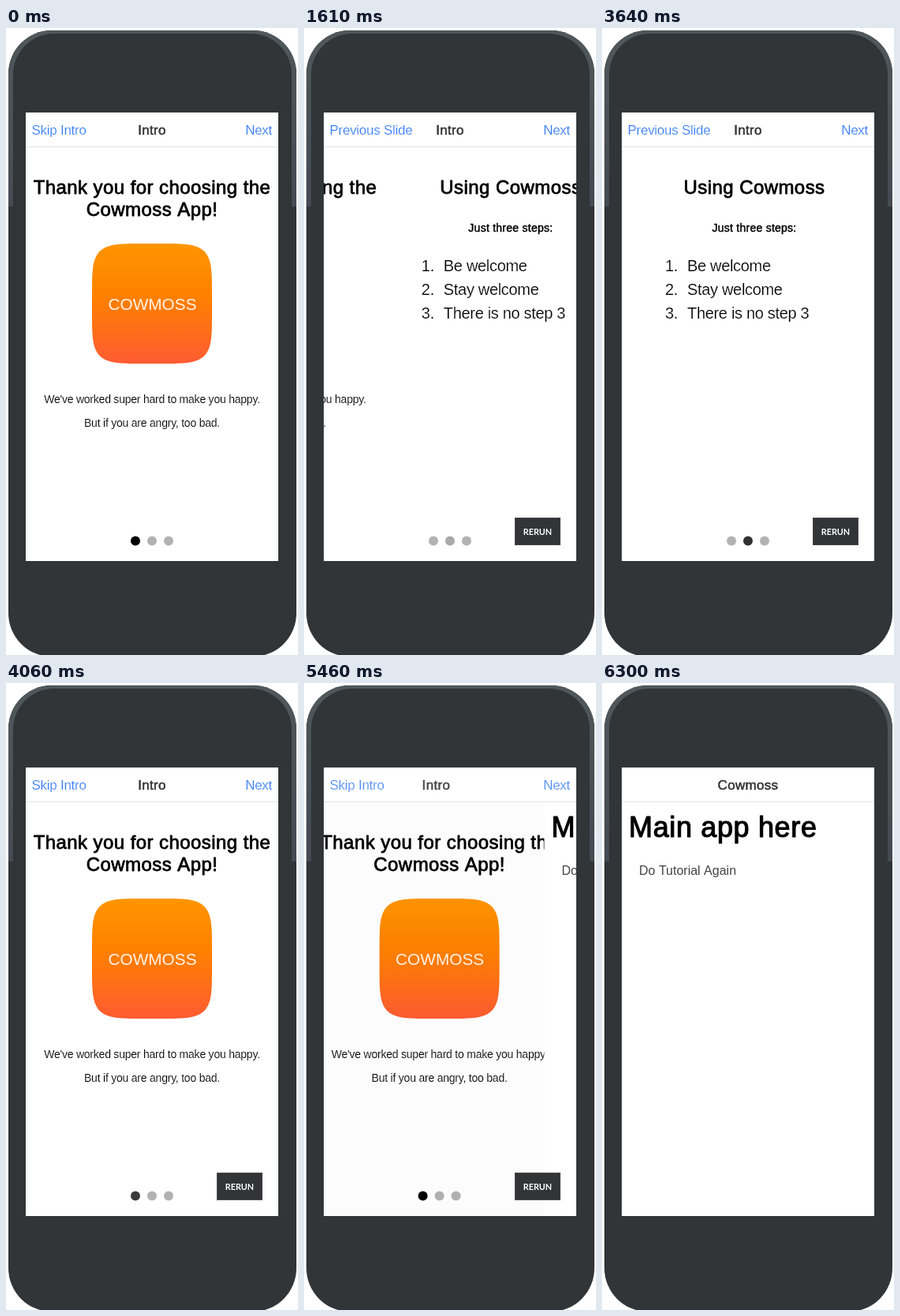
Recreate the animation shown at these times as an HTML page with a canvas. Size 370x794 px, loop 6.79 s.

```html
<!DOCTYPE html>
<html lang="en">
<head>
<meta charset="utf-8">
<title>App intro</title>
<style>
html, body { margin: 0; width: 100%; height: 100%; overflow: hidden; background: #fff; }
canvas { display: block; width: 370px; height: 794px; }
</style>
</head>
<body>
<canvas id="stage"></canvas>
<script>
const W = 370, H = 794, LOOP = 6790, TICK = 70;
const SCREEN = { x: 25, y: 107, w: 320, h: 568 };
const MID = 185, BLUE = '#387ef5';

const canvas = document.getElementById('stage');
const ctx = canvas.getContext('2d');
const dpr = window.devicePixelRatio || 1;
canvas.width = W * dpr;
canvas.height = H * dpr;

const clamp = v => Math.min(1, Math.max(0, v));
const ramp = (t, a, b) => clamp((t - a) / (b - a));

// CSS-style cubic-bezier easing, solved by bisection
function bezier(x1, y1, x2, y2) {
  const at = (a, b, u) => 3 * a * u * (1 - u) ** 2 + 3 * b * u * u * (1 - u) + u ** 3;
  return x => {
    if (x <= 0 || x >= 1) return clamp(x);
    let lo = 0, hi = 1;
    for (let i = 0; i < 24; i++) {
      const mid = (lo + hi) / 2;
      if (at(x1, x2, mid) < x) lo = mid; else hi = mid;
    }
    return at(y1, y2, lo);
  };
}
const ease = bezier(0.25, 0.1, 0.25, 1);
const easeIn = bezier(0.42, 0, 1, 1);
const easeView = bezier(0.36, 0.66, 0.04, 1);

// Each swipe is dragged from one page to `drag`, then settles after release
const SWIPES = [
  { start: 1300, release: 1535, from: 0, drag: 0.594, to: 1 },
  { start: 2345, release: 2545, from: 1, drag: 1.456, to: 2 },
  { start: 3120, release: 3310, from: 2, drag: 1.5, to: 1 },
  { start: 3620, release: 3745, from: 1, drag: 0.53, to: 0 }
];

function slider(t) {
  const state = { pos: 0, page: 0, dot: 1 };
  for (const s of SWIPES) {
    if (t < s.start) break;
    if (t < s.release) {
      state.pos = s.from + (s.drag - s.from) * ramp(t, s.start, s.release) ** 1.6;
    } else {
      state.pos = s.drag + (s.to - s.drag) * ease(ramp(t, s.release, s.release + 300));
      state.page = s.to;
      state.dot = 0.3 + 0.7 * easeIn(ramp(t, s.release, s.release + 400));
    }
  }
  return state;
}

// weight: 'light' trims the outline with the backdrop, 'medium' thickens it
function text(str, x, y, size, { weight = 'regular', align = 'left', color = '#000' } = {}) {
  const spacing = { light: -0.016, regular: 0, medium: 0.018 }[weight];
  ctx.font = `${size}px "Liberation Sans", Arial, sans-serif`;
  ctx.letterSpacing = `${spacing * size}px`;
  ctx.textAlign = align;
  ctx.fillStyle = color;
  ctx.fillText(str, x, y);
  if (weight !== 'regular') {
    ctx.strokeStyle = weight === 'light' ? '#fff' : color;
    ctx.lineWidth = size * (weight === 'light' ? 0.012 : 0.032);
    ctx.lineJoin = 'round';
    ctx.strokeText(str, x, y);
  }
  ctx.letterSpacing = '0px';
}

function rounded(x, y, w, h, r, fill) {
  ctx.beginPath();
  ctx.roundRect(x, y, w, h, r);
  ctx.fillStyle = fill;
  ctx.fill();
}

// Superellipse tile with half-width r
function squircle(cx, cy, r, fill) {
  const curve = v => Math.sign(v) * Math.abs(v) ** 0.4 * r;
  ctx.beginPath();
  for (let i = 0; i < 360; i++) {
    const a = i * Math.PI / 180;
    ctx.lineTo(cx + curve(Math.cos(a)), cy + curve(Math.sin(a)));
  }
  ctx.fillStyle = fill;
  ctx.fill();
}

function clipped(x, y, w, h, draw) {
  ctx.save();
  ctx.beginPath();
  ctx.rect(x, y, w, h);
  ctx.clip();
  draw();
  ctx.restore();
}

function faded(alpha, draw) {
  if (alpha <= 0) return;
  ctx.save();
  ctx.globalAlpha = alpha;
  draw();
  ctx.restore();
}

function shifted(dx, draw) {
  ctx.save();
  ctx.translate(dx, 0);
  draw();
  ctx.restore();
}

function drawPhone() {
  const body = '#313538';
  rounded(3, 3, 365, 793, 55, body);
  clipped(0, 0, W, 226, () => {
    const rim = ctx.createLinearGradient(0, 3, 0, 226);
    rim.addColorStop(0, '#51585b');
    rim.addColorStop(0.47, '#4b5256');
    rim.addColorStop(1, '#454a54');
    rounded(3, 3, 365, 793, 55, rim);
    rounded(9, 7, 353, 785, 52, body);
  });
}

const heading = (str, y) => text(str, MID, y, 24, { weight: 'medium', align: 'center' });
const para = (str, y) => text(str, MID, y, 14, { weight: 'light', align: 'center' });

const PAGES = [
  () => {
    heading('Thank you for choosing the', 210);
    heading('Cowmoss App!', 238);
    const fill = ctx.createLinearGradient(0, 273, 0, 425);
    fill.addColorStop(0, '#ff9500');
    fill.addColorStop(0.45, '#ff8000');
    fill.addColorStop(1, '#ff5b32');
    squircle(MID, 349, 76, fill);
    text('COWMOSS', 185.5, 357, 20.8, { align: 'center', color: '#fff4e8' });
    para("We've worked super hard to make you happy.", 475);
    para('But if you are angry, too bad.', 505);
  },
  () => {
    heading('Using Cowmoss', 210);
    text('Just three steps:', MID, 258, 14, { weight: 'medium', align: 'center' });
    ['Be welcome', 'Stay welcome', 'There is no step 3'].forEach((step, i) => {
      const y = 308 + 30 * i;
      text(`${i + 1}.`, 72, y, 20, { weight: 'light' });
      text(step, 100, y, 20, { weight: 'light' });
    });
  },
  () => {
    heading('Any questions?', 210);
    para('Too bad!', 240);
  }
];

function drawIntro({ pos, page, dot }) {
  PAGES.forEach((draw, i) => {
    const dx = (i - pos) * SCREEN.w;
    if (Math.abs(dx) < SCREEN.w) shifted(dx, draw);
  });
  for (let i = 0; i < 3; i++) {
    ctx.beginPath();
    ctx.arc(164 + 21 * i, 649.5, 6, 0, Math.PI * 2);
    ctx.fillStyle = `rgba(0,0,0,${i === page ? dot : 0.3})`;
    ctx.fill();
  }
}

function drawMain() {
  ctx.fillStyle = '#fff';
  ctx.fillRect(SCREEN.x, SCREEN.y, SCREEN.w, SCREEN.h);
  text('Main app here', 34, 195, 36, { weight: 'medium' });
  text('Do Tutorial Again', 47, 243, 16, { color: '#444' });
}

function drawHeader(page, p) {
  ctx.fillStyle = '#fff';
  ctx.fillRect(SCREEN.x, SCREEN.y, SCREEN.w, 44);
  ctx.fillStyle = '#e2e2e2';
  ctx.fillRect(SCREEN.x, 150, SCREEN.w, 1);
  const title = (str, dx) => text(str, MID + dx, 135, 17, { weight: 'medium', align: 'center', color: '#333' });
  const link = (str, x, align) => text(str, x, 135, 17, { weight: 'light', align, color: BLUE });
  faded(1 - p, () => {
    link(page ? 'Previous Slide' : 'Skip Intro', 32.5, 'left');
    link(page === 2 ? 'Start using OwlUp' : 'Next', 337, 'right');
    title('Intro', -139 * p);
  });
  faded(p, () => title('Cowmoss', 252 * (1 - p)));
}

// Fades as one layer: opaque button under a white veil
function drawRerun(alpha) {
  if (alpha <= 0) return;
  rounded(267, 620, 58, 35, 0, '#47484a');
  rounded(268, 621, 56, 33, 0, '#333437');
  ctx.font = 'bold 10.8px Lato, sans-serif';
  ctx.textAlign = 'center';
  ctx.fillStyle = '#fff';
  ctx.fillText('RERUN', 296, 642);
  rounded(267, 620, 58, 35, 0, `rgba(255,255,255,${1 - alpha})`);
}

function drawStatus() {
  rounded(-5, 776, 235, 25, [0, 4, 0, 0], '#a9a9a9');
  rounded(-5, 777, 234, 17, [0, 3, 0, 0], '#f3f3f3');
  ctx.font = '11.6px "Open Sans", sans-serif';
  ctx.textAlign = 'right';
  ctx.fillStyle = '#000';
  ctx.fillText('theme-id=4024&slug-hash=AjgEB&default...', 225.5, 789);
}

function rerunAlpha(t) {
  if (t < 4740) return ramp(t, 800, 1050);
  if (t < 5180) return 1 - ramp(t, 4740, 5025);
  return ramp(t, 5180, 5390) - ramp(t, 6100, 6290);
}

function render(t) {
  const intro = slider(t);
  const p = easeView(ramp(t, 5425, 5980));
  ctx.setTransform(dpr, 0, 0, dpr, 0, 0);
  ctx.fillStyle = '#fff';
  ctx.fillRect(0, 0, W, H);
  drawPhone();
  clipped(SCREEN.x, SCREEN.y, SCREEN.w, SCREEN.h, () => {
    ctx.fillStyle = '#fff';
    ctx.fillRect(SCREEN.x, SCREEN.y, SCREEN.w, SCREEN.h);
    if (p < 1) shifted(-0.33 * SCREEN.w * p, () => drawIntro(intro));
    if (p > 0) {
      ctx.fillStyle = `rgba(0,0,0,${0.1 * p})`;
      ctx.fillRect(SCREEN.x, SCREEN.y, SCREEN.w, SCREEN.h);
      shifted(SCREEN.w * (1 - p), drawMain);
    }
    drawHeader(intro.page, p);
  });
  drawRerun(rerunAlpha(t));
  faded(ramp(t, 4180, 4540) - ramp(t, 5000, 5200), drawStatus);
}

const begin = performance.now();
function frame() {
  const t = (performance.now() - begin) % LOOP;
  render(Math.floor(t / TICK) * TICK);
  requestAnimationFrame(frame);
}
frame();
</script>
</body>
</html>
```
